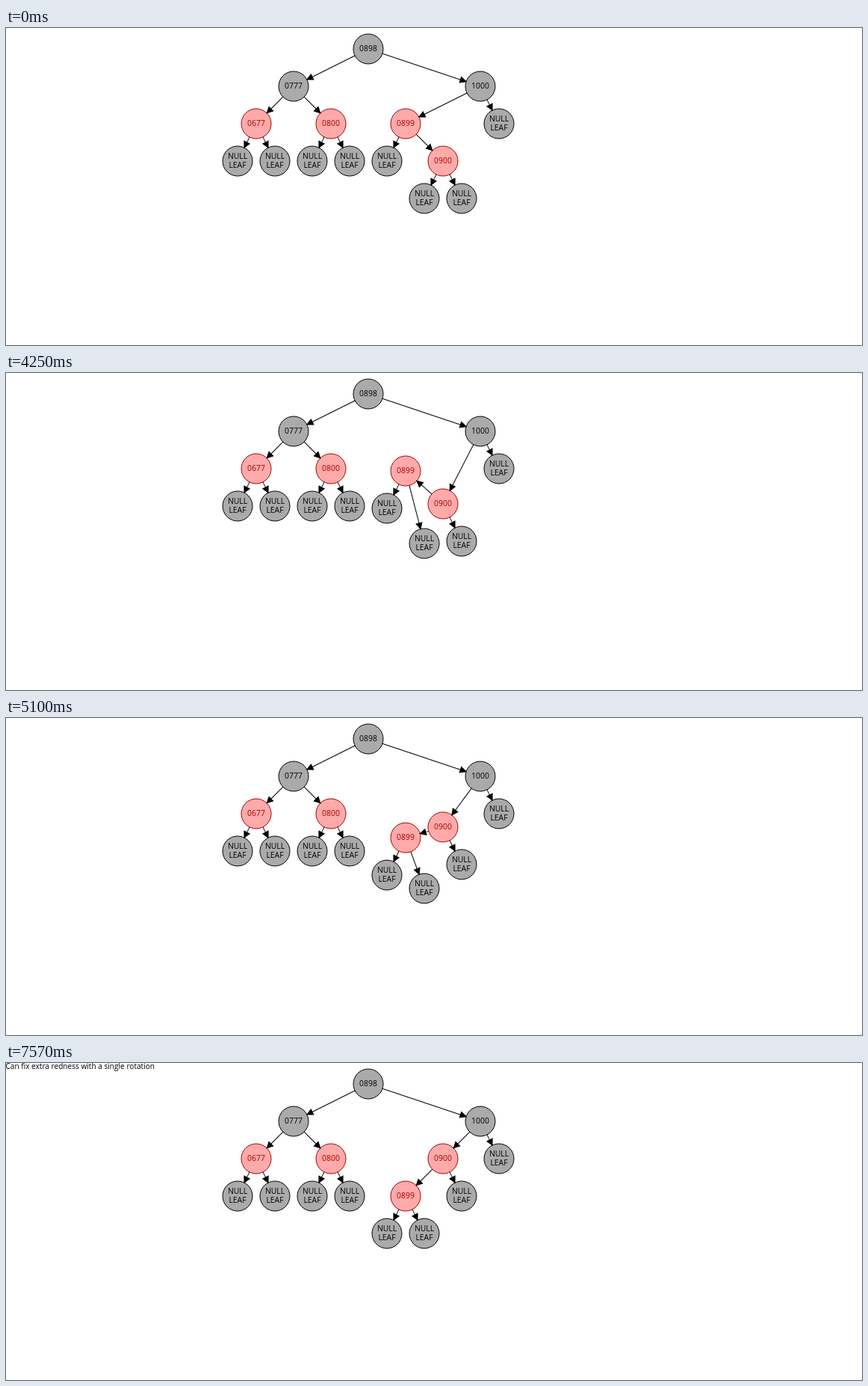
Write an HTML page with a canvas that moves like this. It is 1146 px wide and 424 px high and loops after 8.18 s.

```html
<!DOCTYPE html>
<html lang="en">
<head>
<meta charset="utf-8">
<title>Tree rotation</title>
<style>
  html, body { margin: 0; width: 100%; height: 100%; overflow: hidden; background: #fff; }
  canvas { display: block; }
</style>
</head>
<body>
<canvas id="stage" width="1146" height="424"></canvas>
<script>
const ctx = document.getElementById("stage").getContext("2d");
const FONT = '"Open Sans", "Noto Sans", sans-serif';
const LOOP = 8180, TICK = 76.75;
const HIGHLIGHT = 2630, ROTATE = 4155, MOVE = 1450, MESSAGE = 5700;
const RADIUS = 20, BLACK = "#000", RED = "#a00";

// name: [x, y, red, vertical shift during the rotation]
const nodes = {
  "0898": [485, 28], "0777": [385, 78], "1000": [635, 78],
  "0677": [335, 128, 1], "0800": [435, 128, 1],
  "0899": [535, 128, 1, 50], "0900": [585, 178, 1, -50],
  a: [310, 178], b: [360, 178], c: [410, 178], d: [460, 178],
  e: [510, 178, 0, 50], f: [560, 228], g: [610, 228, 0, -50], h: [660, 128]
};
const pairs = text => text.split(" ").map(p => p.split(">"));
const fixedEdges = pairs("0898>0777 0898>1000 0777>0677 0777>0800 0677>a 0677>b " +
  "0800>c 0800>d 0899>e 0900>g 1000>h");
const oldEdges = pairs("1000>0899 0899>0900 0900>f");
const newEdges = pairs("1000>0900 0900>0899 0899>f");

function position(name, shift) {
  const [x, y, , dy = 0] = nodes[name];
  return [x, y + dy * shift];
}

function drawNode(name, shift) {
  const [x, y] = position(name, shift), red = nodes[name][2];
  ctx.lineWidth = 1;
  ctx.strokeStyle = red ? RED : BLACK;
  ctx.fillStyle = red ? "#faa" : "#aaa";
  ctx.beginPath();
  ctx.arc(x, y, RADIUS, 0, 2 * Math.PI);
  ctx.fill();
  ctx.stroke();
  ctx.fillStyle = ctx.strokeStyle;
  ctx.textAlign = "center";
  ctx.font = "10.4px " + FONT;
  if (name.length > 1) {
    ctx.fillText(name, x, y + 3);
  } else {
    ctx.fillText("NULL", x, y - 3);
    ctx.fillText("LEAF", x, y + 9);
  }
}

function drawEdge([from, to], shift, width = 1, color = BLACK) {
  const [ax, ay] = position(from, shift), [bx, by] = position(to, shift);
  const length = Math.hypot(bx - ax, by - ay);
  ctx.save();
  ctx.translate(ax, ay);
  ctx.rotate(Math.atan2(by - ay, bx - ax));
  ctx.lineWidth = width;
  ctx.strokeStyle = ctx.fillStyle = color;
  const tip = length - RADIUS;
  ctx.beginPath();
  ctx.moveTo(RADIUS, 0);
  ctx.lineTo(tip, 0);
  ctx.stroke();
  ctx.beginPath();
  ctx.moveTo(tip, 0);
  ctx.lineTo(tip - 8, -4);
  ctx.lineTo(tip - 8, 4);
  ctx.closePath();
  ctx.fill();
  ctx.stroke();
  ctx.restore();
}

// Triangle wave between 3 and 5 pixels, widest at 3677 ms
function pulse(t) {
  const phase = Math.abs(t - 3677) / 677 % 2;
  return 3 + 2 * Math.abs(1 - phase);
}

function draw(now) {
  const clock = now % LOOP;
  const t = HIGHLIGHT + Math.floor((clock - HIGHLIGHT) / TICK + 1e-6) * TICK;
  const shift = Math.min(1, Math.max(0, (t - ROTATE) / MOVE));
  const rotated = t >= ROTATE;

  ctx.fillStyle = "#fff";
  ctx.fillRect(0, 0, 1146, 424);
  for (const name in nodes) drawNode(name, shift);
  if (t >= HIGHLIGHT && !rotated) drawEdge(oldEdges[1], shift, pulse(t), RED);
  for (const edge of fixedEdges.concat(rotated ? newEdges : oldEdges)) drawEdge(edge, shift);

  if (clock >= MESSAGE) {
    ctx.fillStyle = BLACK;
    ctx.textAlign = "right";
    ctx.font = "10.1px " + FONT;
    ctx.fillText("Can fix extra redness with a single rotation", 199, 8);
  }
}

const start = performance.now();
function frame() {
  draw(performance.now() - start);
  requestAnimationFrame(frame);
}
frame();
</script>
</body>
</html>
```
